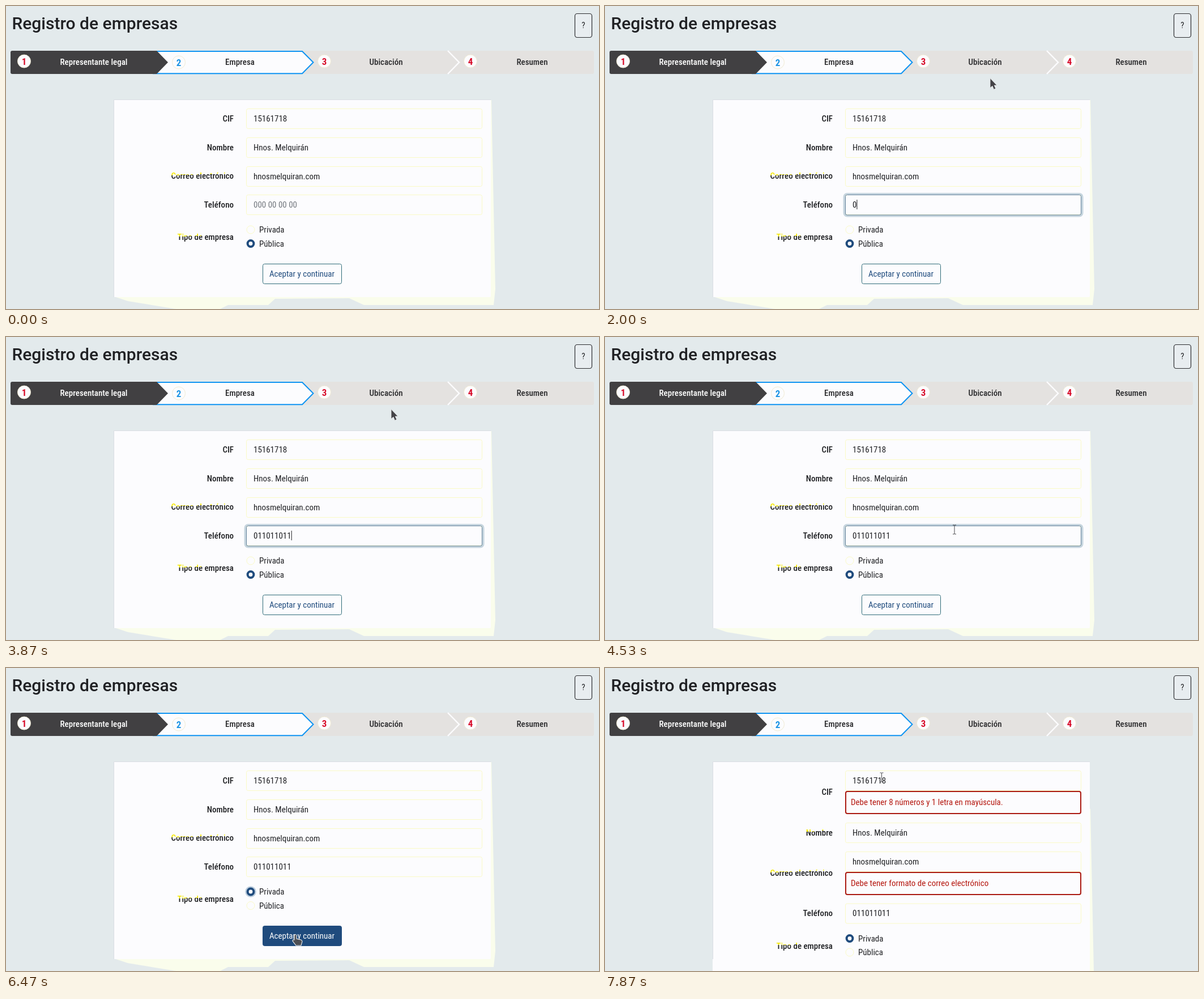
Recreate the animation shown at these times as an HTML page. Size 1047 by 535 pixels, loop 8000 ms.

```html
<!DOCTYPE html>
<html lang="es">
<head>
<meta charset="utf-8">
<title>Registro de empresas</title>
<style>
html, body { margin: 0; width: 100%; height: 100%; overflow: hidden; background: #e3eaec; }
svg { display: block; width: 1047px; height: 535px; }
text { font: 15px "Roboto Condensed", Roboto, sans-serif; font-stretch: 75%; fill: #202124; white-space: pre; }
.title { font: 500 30px Roboto, sans-serif; letter-spacing: 0; }
.bold { font-weight: 500; }
.num { font-weight: 700; font-size: 17px; }
.mid { text-anchor: middle; }
.end { text-anchor: end; }
</style>
</head>
<body>
<svg id="stage" viewBox="0 0 1047 535"></svg>
<script>
const stage = document.getElementById('stage');
const LOOP = 8000, STEP = 1000 / 15;
const FOCUS = 1270, PICK = 5670, PRESS = 6600, REJECT = 6670;
const PHONE = '011011011';
// [time, characters typed]
const KEYS = [[FOCUS, 0], [1800, 1], [2070, 2], [2270, 3], [2670, 4], [2800, 5], [3000, 6], [3670, 7], [3870, 9]];
// [time, x, y] of the pointer
const PATH = [
  [270, 1040, 252], [530, 850, 296], [800, 655, 334], [1000, 592.5, 341], [1130, 577, 341],
  [1270, 577, 341], [1400, 640, 215], [1530, 680, 127.5], [4290, 680, 127.5],
  [4400, 660, 225], [4530, 617, 340], [4800, 530, 375], [5130, 450, 392], [5330, 443, 397],
  [5470, 436, 394], [5700, 436, 394], [6050, 470, 428], [6470, 511, 471],
  [7020, 511, 471], [7400, 502, 350], [7870, 488.5, 193]
];
const BLUE = '#1f4b7d', CREAM = '#fafac6', WHITE = '#fcfcfe';

const text = (x, y, s, cls = '', fill = '') =>
  `<text x="${x}" y="${y}" class="${cls}"${fill && ` style="fill:${fill}"`}>${s}</text>`;
const rect = (x, y, w, h, fill, stroke = 'none', width = 1, r = 3) =>
  `<rect x="${x}" y="${y}" width="${w}" height="${h}" rx="${r}" fill="${fill}" stroke="${stroke}" stroke-width="${width}"/>`;
const path = (d, fill, stroke = 'none', width = 1) =>
  `<path d="${d}" fill="${fill}" stroke="${stroke}" stroke-width="${width}"/>`;
const circle = (x, y, r, fill, stroke = 'none', width = 1) =>
  `<circle cx="${x}" cy="${y}" r="${r}" fill="${fill}" stroke="${stroke}" stroke-width="${width}"/>`;

// Condensed digits are narrow; tighten the tracking when only the normal width exists.
stage.innerHTML = text(0, 0, '00000000');
if (stage.firstChild.getComputedTextLength() > 64) stage.style.letterSpacing = '-1px';
const digit = stage.firstChild.getComputedTextLength() / 8;

const badge = (x, y, n, color) =>
  circle(x, y, 11.5, WHITE, '#f0ead2') + text(x, y + 6, n, 'num mid', color);

const header =
  `<defs><linearGradient id="split" x1="0" y1="0" x2=".2" y2="1">
    <stop offset=".43" stop-color="#f6e900"/><stop offset=".43" stop-color="#202124"/>
  </linearGradient></defs>` +
  rect(0, 0, 1047, 535, '#e3eaec', 'none', 0, 0) +
  text(10.5, 41, 'Registro de empresas', 'title') +
  rect(1004.5, 13.5, 30, 42, '#e8edf0', '#2c2d30', 1.2, 4) + text(1019.5, 39, '?', 'mid') +
  rect(266, 79, 772, 41, '#e4e2e0') +
  path('M780 79L800 99.5L780 120', 'none', WHITE, 2.5) +
  path('M260 80H523L542.5 99.5L523 119.3H260Z', WHITE, '#0f94f2', 2) +
  path('M11 79H266L286 99.5L266 120H11Q8 120 8 117V82Q8 79 11 79Z', '#414042') +
  badge(32, 97.5, 1, '#d80f2c') + badge(305, 99.5, 2, '#1c94e4') +
  badge(562, 97.5, 3, '#d80f2c') + badge(820, 97.5, 4, '#d80f2c') +
  ['Representante legal', 'Empresa', 'Ubicación', 'Resumen']
    .map((s, i) => text(155 + 258 * i, 104, s, 'bold mid', i ? '#2b2b2d' : '#fff')).join('');

const shade = path('M191 513L215 521L300 535H378L392 528H463L475 517L606 516L632 528H861L864 500L857 166H191Z', '#fafdec');

const label = (y, s, split) => text(402, y, s, 'bold end', split ? 'url(#split)' : '');
const field = (y, s, color) => rect(424.5, y + .5, 416, 35, WHITE, CREAM) + text(437, y + 22.5, s, '', color);
const error = (y, s) => rect(425, y + 1, 415, 39, WHITE, '#ab1a12', 2) + text(434, y + 24.5, s, '', '#b5170f');
const radio = (y, s, on, focused) =>
  (focused ? circle(432, y, 9.8, '#bccddd') : '') +
  (on ? circle(432, y, 5.4, WHITE, BLUE, 4) : circle(432, y, 7, WHITE, CREAM)) +
  text(447, y + 5, s);

function pointerAt(t) {
  if (t < PATH[0][0]) return null;
  const i = PATH.findIndex(p => p[0] > t);
  if (i < 0) return PATH[PATH.length - 1].slice(1);
  const [t0, x0, y0] = PATH[i - 1], [t1, x1, y1] = PATH[i];
  const k = (t - t0) / (t1 - t0);
  return [x0 + (x1 - x0) * k, y0 + (y1 - y0) * k];
}

const CURSORS = {
  beam: path('M-3 -8H-1Q0 -8 0 -7Q0 -8 1 -8H3M0 -7V7M-3 8H-1Q0 8 0 7Q0 8 1 8H3', 'none', '#4a4b4e'),
  arrow: path('M0 0V17L4 13.8L6.5 19.8L9.8 18.3L7.3 12.6H12Z', '#444347', '#eef0f2', .8),
  hand: path('M-2 1Q0 -2 2 1V7L10 9Q12 10 12 12L10 19H1L-5 11Q-5 8 -2 9Z', '#4d4f54', '#f4f4f4', 1.1)
};

function draw(t) {
  const failed = t >= REJECT, focused = t >= FOCUS && t < PICK, picked = t >= PICK;
  const shift = failed ? 41 : 0, drop = failed ? 82.5 : 0;
  const [typedAt, typed] = KEYS.filter(k => k[0] <= t).pop() || [0, 0];
  const tops = [181, 232 + shift, 283 + shift, 333 + drop];
  const pointer = pointerAt(t);
  const within = (x, y, w, h) => pointer && pointer[0] >= x && pointer[0] <= x + w && pointer[1] >= y && pointer[1] <= y + h;
  const overButton = within(453, 456 + drop, 140, 35);
  const overField = tops.some(y => within(424, y, 417, 36));

  let out = header + `<g transform="translate(0 ${drop})">${shade}</g>` +
    rect(190, 165, 666, 349 + drop, WHITE, 'none', 0, 2) + path('M190.5 514V165.5H856', 'none', '#dadde3');

  out += label(failed ? 224 : 203.5, 'CIF') + field(tops[0], '15161718') +
    label(254.5 + shift, 'Nombre', failed) + field(tops[1], 'Hnos. Melquirán') +
    label(failed ? 367 : 305, 'Correo electrónico', true) + field(tops[2], 'hnosmelquiran.com');
  if (failed) out += error(217, 'Debe tener 8 números y 1 letra en mayúscula.') +
    error(360, 'Debe tener formato de correo electrónico');

  out += label(355.5 + drop, 'Teléfono');
  if (focused) out += rect(422.5, 332, 420, 38.5, 'none', '#c6d5df', 4, 5);
  out += typed ? field(tops[3], PHONE.slice(0, typed)) : field(tops[3], '000 00 00 00', '#72777d');
  if (focused) {
    out += rect(424.5, 333.5, 416, 35.5, 'none', '#64829b');
    if ((t - typedAt) % 1000 < 480) out += rect(437 + typed * digit, 342, 1, 17, '#202124', 'none', 0, 0);
  }

  out += label(413 + drop, 'Tipo de empresa', true) +
    radio(395 + drop, 'Privada', picked, picked && t < PRESS) +
    radio(419.5 + drop, 'Pública', !picked) +
    rect(453.5, 455.5 + drop, 139, 35, overButton ? BLUE : WHITE, overButton ? BLUE : '#2f6b78') +
    text(522.5, 478 + drop, 'Aceptar y continuar', 'mid', overButton ? '#fff' : BLUE);

  if (pointer) out += `<g transform="translate(${pointer})">${CURSORS[overButton ? 'hand' : overField ? 'beam' : 'arrow']}</g>`;
  stage.innerHTML = out;
}

let shown = -1;
function tick() {
  const step = Math.floor((performance.now() % LOOP + 5) / STEP);
  if (step !== shown) draw(Math.round((shown = step) * STEP / 10) * 10);
  requestAnimationFrame(tick);
}
tick();
</script>
</body>
</html>
```
